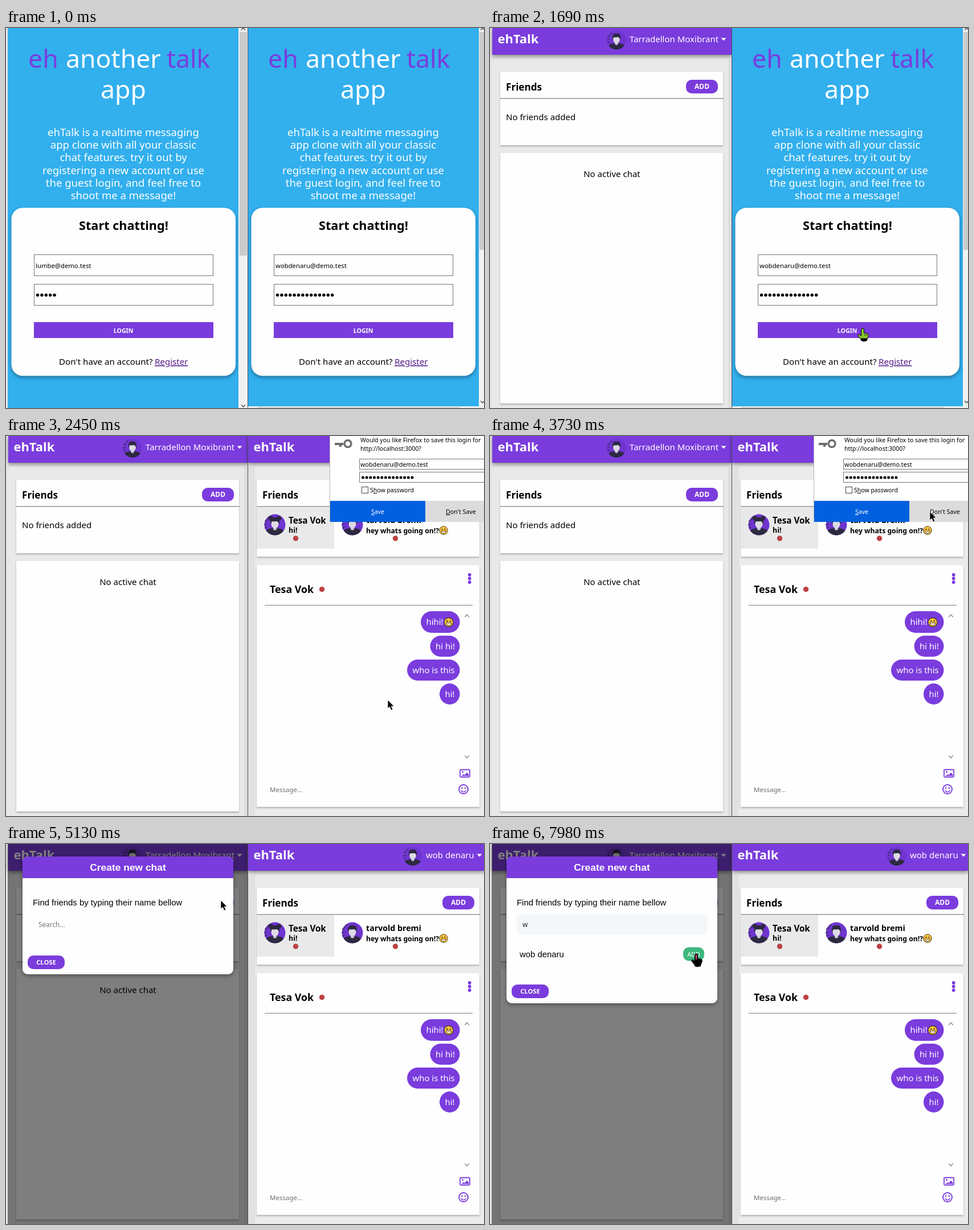
These frames come from a looping animation (839x668 px, 8000 ms). An HTML page:

```html
<!DOCTYPE html>
<html lang="en">
<head>
<meta charset="utf-8">
<title>Chat demo</title>
<style>
html, body { margin: 0; width: 100%; height: 100%; overflow: hidden; background: #e9e9e9; }
svg { display: block; width: 100%; height: 100%; }
text { font-family: "Noto Sans", "Open Sans", sans-serif; white-space: pre; }
.b { font-weight: 700; }
.m { text-anchor: middle; }
.w { fill: #fff; }
.p { fill: #7a3cdd; }
.a { font-family: "Liberation Sans", Arial, sans-serif; }
.u { text-decoration: underline; }
.card { fill: #fefefe; filter: drop-shadow(0 2px 1.5px rgba(0,0,0,.25)); }
.bar { filter: drop-shadow(0 2px 3px rgba(0,0,0,.45)); }
.login { fill: #fefefe; filter: drop-shadow(0 3px 3px rgba(0,0,0,.35)); }
.field { fill: #fefefe; stroke: #767676; }
.line { stroke: #808080; stroke-width: 1.2; }
</style>
</head>
<body>
<svg id="stage" viewBox="0 0 839 668" preserveAspectRatio="none" xmlns="http://www.w3.org/2000/svg"></svg>
<script>
const GUEST = "Tarradellon Moxibrant", USER = "wob denaru", APP = "ehTalk";
const FRIEND = "Tesa Vok", OTHER = "tarvold bremi";
const GUEST_MAIL = "lumbe@demo.test", USER_MAIL = "wobdenaru@demo.test";
const PURPLE = "#7a3cdd", INK = "#2c2940";

const rect = (x, y, w, h, attrs = "") => `<rect x="${x}" y="${y}" width="${w}" height="${h}" ${attrs}/>`;
const text = (x, y, size, str, cls = "", attrs = "") =>
  `<text x="${x}" y="${y}" font-size="${size}" class="${cls}" ${attrs}>${str}</text>`;
const circle = (x, y, r, fill) => `<circle cx="${x}" cy="${y}" r="${r}" fill="${fill}"/>`;
const path = (d, attrs = "") => `<path d="${d}" ${attrs}/>`;
const group = (id, body, attrs = "") => `<g id="${id}" ${attrs}>${body}</g>`;
const stroke = (color, w = 1) => `fill="none" stroke="${color}" stroke-width="${w}" stroke-linecap="round"`;
const dots = (x, y, n, gap, r) => Array.from({ length: n }, (_, i) => circle(x + i * gap, y, r, "#000")).join("");
const redDot = (x, y) => circle(x, y, 4.7, "#bb4141");

function pill(x, y, w, label, size, cls = "b", fill = PURPLE) {
  return rect(x, y, w, 24, `rx="10" fill="${fill}"`) + text(x + w / 2, y + 16.4, size, label, "m w " + cls);
}

function loginPage(dx, mail, count, focusId) {
  const lines = [
    `${APP} is a realtime messaging`, "app clone with all your classic", "chat features. try it out by",
    "registering a new account or use", "the guest login, and feel free to", "shoot me a message!"
  ];
  return `<g transform="translate(${dx})">` +
    text(39, 70, 44.6, "eh", "p") + text(105, 70, 44.6, "another", "w") + text(282, 70, 44.6, "talk", "p") +
    text(206, 124, 44.6, "app", "m w") +
    lines.map((s, i) => text(206, 190 + i * 22.2, 18.5, s, "m w")).join("") +
    rect(9.5, 316, 393.5, 295.5, 'rx="20" class="login"') +
    text(206.5, 355, 21.6, "Start chatting!", "m b") +
    rect(49.5, 398.5, 314, 37, 'class="field"') + rect(49.5, 450.5, 314, 37, 'class="field"') +
    text(52, 421.5, 11.3, mail) + dots(55.5, 469.5, count, 7.4, 2.7) +
    rect(49, 517, 315, 28, `fill="${PURPLE}"`) +
    rect(48.5, 516.5, 316, 29, `id="${focusId}" fill="none" stroke="#8d8d99" visibility="hidden"`) +
    text(206, 535.5, 10.6, "LOGIN", "m b w") +
    text(93, 592, 15.1, "Don't have an account?") + text(261, 592, 15.1, "Register", "u", 'fill="#551a8b"') +
    "</g>";
}

function avatar(x, y, r, buns) {
  const hair = (buns ? circle(-7, -11, 4, INK) + circle(7, -11, 4, INK) : "") +
    path("M-7 0Q-10-13 0-13T7 0Q6-6 2-6Q-3-5-5-6Q-6-4-7 0z", `fill="${INK}"`);
  return `<g transform="translate(${x} ${y}) scale(${r / 18})">` + circle(0, 0, 18, "#6f35cf") +
    path("M-13-9l-4 3M-14-2l-4 2M-14 4l-3 2M-9-14l-3 2", stroke(INK, 1.2)) +
    path("M-15 10Q-11 6-4 6H4Q11 6 15 10A18 18 0 0 1-15 10z", `fill="${INK}"`) +
    path("M-3 3H3V8Q0 11-3 8z", 'fill="#c4c0cf"') +
    path("M-6.5-6Q0-11 6.5-6Q7.5 5 0 6.5Q-7.5 5-6.5-6z", 'fill="#dddae3"') + hair + "</g>";
}

function emoji(x, y, r) {
  return `<g transform="translate(${x} ${y}) scale(${r / 8})">` +
    `<circle r="7.6" fill="#fcc53f" stroke="#3a2a10"/>` + circle(-2.6, -2, 1.2, "#3a2a10") + circle(2.6, -2, 1.2, "#3a2a10") +
    path("M-4.6 1.2H4.6Q3.6 5.2 0 5.2Q-3.6 5.2-4.6 1.2z", 'fill="#fff" stroke="#3a2a10" stroke-width=".9"') + "</g>";
}

function header(x, w, avatarX, nameX, name, caretX) {
  return rect(x, 0, w, 47, 'class="bar p"') + text(x + 9.5, 27, 21.9, APP, "b w") +
    avatar(avatarX, 21.5, 16.5) + text(nameX, 24.5, 15, name, "w") +
    path(`M${caretX} 17.5h9l-4.5 5z`, 'fill="#fff"');
}

function friendsCard(x, h) {
  return rect(x, 77, 391, h, 'class="card"') + text(x + 10, 110, 17.1, "Friends", "b") +
    pill(x + 326, 91, 56, "ADD", 12) + path(`M${x} 123.8h392`, 'class="line"');
}

const leftDash = rect(4, 0, 420, 668, 'fill="#dedede"') + rect(4, 54, 414, 640, 'rx="6" fill="#e9e9e9"') +
  header(4, 420, 222, 245, GUEST, 405.5) + friendsCard(18, 129) +
  text(28, 162, 15, "No friends added") +
  rect(18, 220, 391, 440, 'class="card"') + text(214, 262, 15, "No active chat", "m");

function bubble(x, y, h, str, smile) {
  return rect(x, y, 796.5 - x, h, `rx="${h / 2}" fill="${PURPLE}"`) +
    text(x + 9.5, y + 24, 14.9, str, "w") + (smile ? emoji(777, y + 19.5, 8.3) : "");
}

const rightDash = rect(425, 0, 414, 668, 'fill="#e1e1e1"') + rect(437, 54, 420, 640, 'rx="6" fill="#ebebeb"') +
  header(425, 414, 714, 737, USER, 826.5) + friendsCard(440, 135) +
  rect(440, 125, 136, 73, 'fill="#e9e9e9"') +
  avatar(472, 156, 18.5, true) + text(496, 154, 15.2, FRIEND, "b") + text(496, 170, 12.4, "hi!", "b") + redDot(508.5, 180) +
  avatar(608, 156, 18.5) + text(632, 153, 14.2, OTHER, "b") +
  text(632, 171, 12.2, "hey whats going on!?", "b") + emoji(768, 166, 7.6) + redDot(683.5, 180) +
  rect(440, 227, 391, 425, 'class="card"') +
  text(463, 275.5, 17.8, FRIEND, "b") + redDot(554.5, 269.5) +
  [244, 250.5, 257].map(y => circle(813.7, y, 2.9, PURPLE)).join("") +
  path("M454 297.5H819", 'class="line"') +
  bubble(728, 308, 38, "hihi!", true) + bubble(744.5, 351, 37, "hi hi!") +
  bubble(704, 393, 37, "who is this") + bubble(761, 435, 37, "hi!") +
  path("M805.5 318l3.5-4 3.5 4M805.5 562l3.5 4 3.5-4", stroke("#8a8a8a", 1.3)) +
  rect(797, 586.5, 17, 13, `rx="1.5" ${stroke(PURPLE, 1.8)}`) + circle(801.5, 590.5, 1.5, PURPLE) +
  path("M799.5 597.5l3.5-3 2 1.5 4-4.5 3.5 4v2z", 'class="p"') +
  `<circle cx="803" cy="621" r="8" ${stroke(PURPLE, 1.9)}/>` + circle(800.2, 618.8, 1.3, PURPLE) + circle(805.8, 618.8, 1.3, PURPLE) +
  path("M799 623.5q4 4.5 8 0", stroke(PURPLE, 1.6)) +
  text(463, 626, 11.5, "Message...", "", 'fill="#6b6b6b"');

const underline = s => `<tspan class="u">${s[0]}</tspan>${s.slice(1)}`;
const dialog = rect(568.5, -10, 280, 160.5, 'fill="#fff" stroke="#b5b5b5"') +
  path("M577 12h15v4h-3v3h-4v-3h-8z", 'fill="#6c6c6c"') + `<circle cx="600" cy="13.5" r="6" ${stroke("#6c6c6c", 3.4)}/>` +
  text(622, 11, 10.5, "Would you like Firefox to save this login for") + text(622, 26, 10.5, "http://localhost:3000?") +
  rect(620.5, 40.5, 230, 18, 'class="field"') + text(622, 54, 10.75, USER_MAIL) +
  rect(620.5, 63.5, 230, 18, 'class="field"') + dots(626.5, 73, 14, 6.65, 2.5) +
  rect(624.5, 89.5, 11, 11, 'fill="#fff" stroke="#444"') +
  text(639, 99, 10.5, 'S<tspan class="u">h</tspan>ow password') +
  rect(569, 114, 167, 37, 'fill="#0060df"') + text(652.5, 137, 10.6, underline("Save"), "m w") +
  rect(736, 114, 110, 37, 'fill="#dcdcdc"') + text(772, 137, 10.6, underline("Don't Save"));

const modal = rect(29, 22, 370, 207, 'id="sheet" rx="9" class="login"') +
  path("M29 60V31a9 9 0 0 1 9-9H390a9 9 0 0 1 9 9V60z", 'class="p"') +
  text(214, 47, 17.4, "Create new chat", "m b w a") +
  text(47, 108, 14.9, "Find friends by typing their name bellow", "a") +
  rect(46.5, 124.5, 335, 35, 'id="input" fill="none"') +
  text(57, 146.3, 11.8, "Search...", "", 'id="query"') + path("M67.5 135V149", 'id="caret" stroke="#222"') +
  group("result", text(52, 198.5, 14.9, USER, "a") + pill(339, 181.5, 37, "ADD", 10.6, "", "#3eb87f")) +
  group("close", pill(38, 196, 65, "CLOSE", 11.2));

const hand = path("M-4 16Q2 13 9 16l-1 4.5Q2 24-3 20.5z") +
  path("M-2.4 1.5a2.4 2.4 0 0 1 4.8 0V7l6 1.5q2 .8 2 3.5l-2 5H-4l-4-5q-1-3 2-2.5l3.6 2.5z",
    'id="palm" stroke="#000" stroke-linejoin="round"') +
  path("M4 9v3M7 10v2", 'stroke="#000" stroke-width=".8"') +
  path("M0 2V8", 'id="finger" fill="none" stroke-width="2.4" stroke-linecap="round"');
const cursors = group("hand", hand) +
  group("arrow", path("M0 0V15l3.4-3 2.6 6 2.8-1.2-2.6-5.8H11z", 'stroke="#fff" stroke-width=".7"')) +
  group("beam", path("M-4-7.5h3l1 1 1-1h3M-4 7.5h3l1-1 1 1h3M0-7V7", stroke("#000", 2)));

const track = 'fill="#f1f1f1"', thumb = 'fill="#cbcbcb"';
const chevrons = (x, bottom) => path(`M${x - 3} 3l3-3 3 3M${x - 3} ${bottom}l3 3 3-3`, stroke("#505050", 1.5));

document.getElementById("stage").innerHTML =
  rect(0, 0, 4, 668, 'fill="#e6e6e6"') +
  group("leftLogin", rect(3, 0, 405, 668, 'fill="#32afed"') + rect(408, 0, 16, 668, track) +
    rect(410, 7, 13, 393, thumb) + chevrons(416.5, 663) + loginPage(0, GUEST_MAIL, 5, "focus")) +
  group("leftDash", leftDash) +
  group("rightLogin", rect(425, 0, 405, 668, 'fill="#32afed"') + rect(830, 0, 9, 668, track) +
    rect(831, 7, 8, 383, thumb) + chevrons(836.5, 656) + rect(425, 665, 414, 3, track) +
    rect(441, 666.5, 356, 2, thumb) + loginPage(421, USER_MAIL, 14, "focusRight")) +
  group("rightDash", rightDash) +
  rect(424, 0, 1, 668, 'fill="#4c4c4c"') +
  group("shade", rect(3, 0, 421, 668, 'fill-opacity=".5"')) +
  group("modal", modal) + group("dialog", dialog) + group("cursor", cursors);

const el = {};
document.querySelectorAll("[id]").forEach(e => el[e.id] = e);
const show = (e, on) => e.setAttribute("visibility", on ? "inherit" : "hidden");
const set = (e, attrs) => { for (const k in attrs) e.setAttribute(k, attrs[k]); };

// Bursts of movement: start, end, number of steps
const bursts = [[270, 1250, 8], [1380, 1690, 3], [2000, 3000, 7], [3160, 4150, 8],
  [4270, 5280, 8], [5430, 5880, 4], [6310, 7280, 7], [7430, 7980, 5]];
// Cursor stops: time, x, y
const stops = [[270, 225, 645], [830, 210, 529], [1000, 225, 531], [1250, 432, 540], [1380, 490, 538], [1532, 566, 531],
  [1690, 654, 529], [2200, 654, 529], [3000, 750, 139], [3726, 772, 133], [3870, 772, 133], [4150, 433, 118],
  [4560, 375, 100], [5140, 377, 99], [5280, 283, 118], [5880, 114, 153], [6900, 114, 153],
  [7280, 330, 186], [7700, 363, 194], [7980, 362, 194]];
// Cursor shapes from a time on
const shapes = [[270, "arrow"], [690, "hand"], [1110, "arrow"], [1510, "hand"], [2280, "arrow"], [4550, "hand"],
  [4700, "arrow"], [5700, "beam"], [6940, "arrow"], [7430, "hand"]];

function held(t) {
  const b = bursts.filter(b => t >= b[0]).pop();
  if (!b) return 0;
  const [start, end, n] = b, step = (end - start) / (n - 1);
  return start + step * Math.min(n - 1, Math.floor((t - start + 20) / step));
}

function place(t) {
  const i = stops.findIndex(s => s[0] >= t);
  if (i < 1) return (i ? stops[stops.length - 1] : stops[0]).slice(1);
  const [t0, x0, y0] = stops[i - 1], [t1, x1, y1] = stops[i], k = (t - t0) / (t1 - t0);
  return [x0 + (x1 - x0) * k, y0 + (y1 - y0) * k];
}

const level = (t, steps) => steps.reduce((v, [at, to]) => t >= at ? to : v, 0);

function draw(t) {
  const leftIn = t >= 1690, rightIn = t >= 2450;
  show(el.leftLogin, !leftIn);
  show(el.leftDash, leftIn);
  show(el.rightLogin, !rightIn);
  show(el.rightDash, rightIn);
  show(el.focus, t >= 830 && !leftIn);

  const pop = level(t, [[2150, .15], [2300, 1], [3870, .5], [4010, 0]]);
  set(el.dialog, { opacity: pop, transform: `translate(0 ${-5.5 * (1 - pop)})` });

  const open = level(t, [[4700, .35], [4845, .8], [4990, 1]]);
  el.shade.setAttribute("opacity", open);
  set(el.modal, { opacity: open, transform: `translate(0 ${-50 * (1 - open)})` });

  const touched = t >= 6310, typed = t >= 6480, found = t >= 6630, focused = touched && t < 7840;
  set(el.input, { fill: touched ? "#f4f7f9" : "none", stroke: focused ? "#a2a8ad" : "none" });
  el.query.textContent = typed ? "w" : "Search...";
  el.query.setAttribute("fill", typed ? "#222" : "#757575");
  el.caret.setAttribute("transform", typed ? "" : "translate(-10)");
  show(el.caret, focused);
  show(el.result, found);
  el.sheet.setAttribute("height", found ? 258 : 207);
  el.close.setAttribute("transform", `translate(0 ${found ? 51 : 0})`);

  const shape = (shapes.filter(s => t >= s[0]).pop() || [])[1];
  for (const name of ["hand", "arrow", "beam"]) show(el[name], name === shape);
  el.cursor.setAttribute("transform", `translate(${place(held(t))})`);
  const dark = t >= 7430;
  el.palm.setAttribute("fill", dark ? "#000" : "#86c92c");
  el.finger.setAttribute("stroke", dark ? "#e0457b" : "#86c92c");
}

const begin = performance.now();
function loop() {
  draw((performance.now() - begin) % 8000);
  requestAnimationFrame(loop);
}
loop();
</script>
</body>
</html>
```
